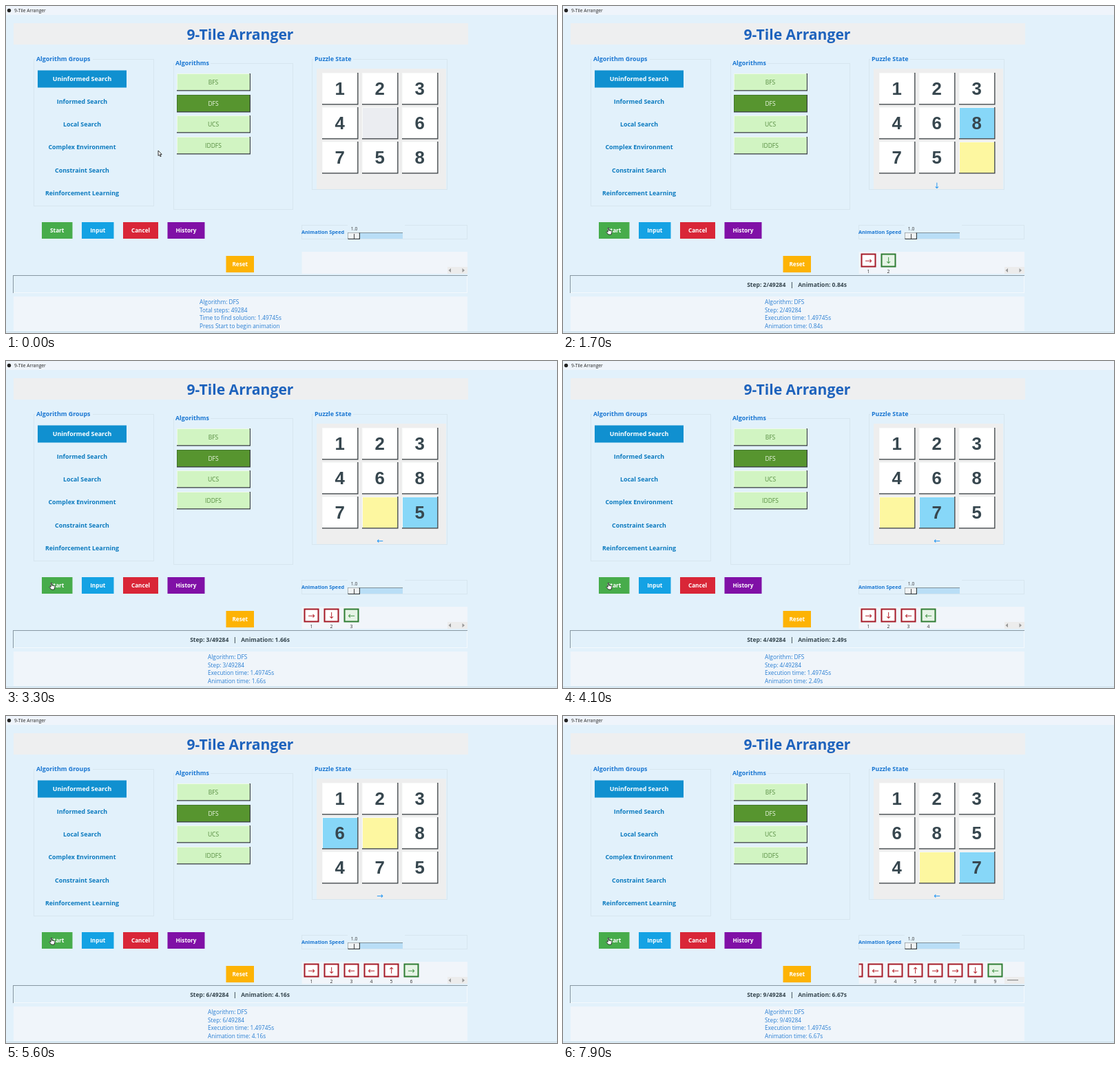
Recreate the animation shown at these times as an HTML page with a canvas. Size 800 by 475 pixels, loop 8000 ms.

```html
<!DOCTYPE html>
<html lang="en">
<head>
<meta charset="utf-8">
<title>9-Tile Arranger</title>
<style>
html, body { margin: 0; overflow: hidden; background: #e2f1fb; }
canvas { display: block; }
</style>
</head>
<body>
<canvas id="stage" width="800" height="475"></canvas>
<script>
const ctx = document.getElementById('stage').getContext('2d');
const LOOP = 8000, TICK = 100;
const FIRST_STEP = 845, STEP_TIME = 830, TOTAL = 49284;
const MOVES = '→↓←←↑→→↓←';
const OFFSET = { '→': 1, '←': -1, '↓': 3, '↑': -3 };
const UI = '"Open Sans", sans-serif';
const TITLE = '9-Tile Arranger';
const BLUE = '#1976d2', INK = '#37474f';

function rect(x, y, w, h, color) {
  ctx.fillStyle = color;
  ctx.fillRect(x, y, w, h);
}

function text(str, x, y, size, color, { bold = true, align = 'center', family = UI, rise = 0.355 } = {}) {
  ctx.font = `${bold ? 700 : 400} ${size}px ${family}`;
  ctx.textAlign = align;
  ctx.fillStyle = color;
  ctx.fillText(str, x, y + size * rise);
}

function arrow(dir, x, y, size, color) {
  text(dir, x, y, size, color, { bold: false, family: '"DejaVu Sans", sans-serif', rise: 0.31 });
}

function bevel(x, y, w, h, fill, light = '#f8faf9') {
  rect(x, y, w, h, '#3a4144');
  rect(x, y, w - 1.4, h - 1.4, light);
  rect(x + 1, y + 1, w - 2.4, h - 2.4, fill);
}

function flatButton(label, x, y, w, h, fill) {
  rect(x, y, w, h, fill);
  text(label, x + w / 2, y + h / 2, 8.2, '#fff');
}

function outline(x, y, w, h) {
  ctx.strokeStyle = '#d7e6ef';
  ctx.lineWidth = 1;
  ctx.strokeRect(x + 0.5, y + 0.5, w, h);
}

function group(label, x, y, w, h, labelX, labelW) {
  outline(x, y, w, h);
  rect(labelX - 2, y - 6, labelW + 4, 12, '#e2f1fb');
  text(label, labelX, y, 8.9, BLUE, { align: 'left' });
}

function drawWindow() {
  rect(0, 0, 800, 475, '#e2f1fb');
  rect(0, 0, 800, 13, '#eff4fb');
  ctx.fillStyle = '#222';
  ctx.beginPath();
  ctx.arc(4.5, 6.5, 2.7, 0, 7);
  ctx.fill();
  text(TITLE, 12, 6.5, 6.7, '#222', { bold: false, align: 'left' });
  rect(11, 25, 660, 31, '#eeeff0');
  text(TITLE, 340, 41.5, 21.1, '#1e63bd');
  rect(0, 473, 800, 1, '#c9dae5');
}

function drawMenus() {
  group('Algorithm Groups', 40, 77, 174, 213, 44, 80);
  rect(46, 93.5, 129, 25, '#1090d0');
  ['Uninformed Search', 'Informed Search', 'Local Search', 'Complex Environment',
    'Constraint Search', 'Reinforcement Learning'].forEach((label, i) =>
    text(label, 110.5, 106 + 33.1 * i, 8.9, i ? '#0b7abf' : '#fff'));

  group('Algorithms', 243, 83, 173, 212, 246, 49);
  ['BFS', 'DFS', 'UCS', 'IDDFS'].forEach((label, i) => {
    const y = 98 + 30.7 * i, active = i === 1;
    bevel(248, Math.round(y), 107, 25.5, active ? '#57952f' : '#d1f4c2', active ? '#44772a' : '#eefae8');
    text(label, 301, y + 12.8, 8.5, active ? '#eef8e8' : '#558b3f', { bold: false });
  });

  flatButton('Start', 52, 314, 44.5, 24, '#47ac4b');
  flatButton('Input', 110, 314, 46.5, 24, '#14a2e4');
  flatButton('Cancel', 170, 314, 51, 24, '#d92637');
  flatButton('History', 234.5, 314, 54, 24, '#8010a6');
  flatButton('Reset', 319.5, 363, 40.5, 24, '#fdb305');
}

function drawSlider() {
  outline(429, 318, 240, 20);
  rect(496, 316, 83, 22, '#e2f1fb');
  text('Animation Speed', 429, 328, 7.3, BLUE, { align: 'left' });
  text('1.0', 505.5, 324, 6.7, '#333', { bold: false });
  rect(496, 329, 80, 9, '#7f9098');
  rect(497, 330, 79, 8, '#b9def6');
  bevel(496.5, 329.5, 17.5, 9.5, '#eff3f5');
  rect(505, 331, 1, 7, '#444');
}

function drawPuzzle(step) {
  group('Puzzle State', 444, 77, 196, 189, 448, 54);
  rect(451, 91, 188, 175, '#eeeeee');
  const tiles = [1, 2, 3, 4, 0, 6, 7, 5, 8];
  let empty = 4, moved = -1;
  for (const dir of MOVES.slice(0, step)) {
    moved = empty;
    empty += OFFSET[dir];
    tiles[moved] = tiles[empty];
    tiles[empty] = 0;
  }
  tiles.forEach((value, i) => {
    const x = 459 + 58 * (i % 3), y = 97 + 50 * Math.floor(i / 3);
    const fill = i === moved ? '#87d7f8' : value ? '#fff' : step ? '#fdf7a0' : '#ebedf1';
    bevel(x, y, 52.5, 46.5, fill);
    if (value) text(value, x + 25.7, y + 23, 25.8, INK, { family: '"Liberation Sans", sans-serif' });
  });
  if (step) arrow(MOVES[step - 1], 543, 261, 11.5, '#2196f3');
}

function drawHistory(step) {
  const scroll = Math.max(0, (step + 1) * 29 - 242);
  ctx.save();
  ctx.beginPath();
  ctx.rect(429.5, 357, 241, 33);
  ctx.clip();
  rect(429, 357, 241, 32, '#f1f5fa');
  for (let i = 0; i < step; i++) {
    const x = 432.5 + 29 * i - scroll, current = i === step - 1;
    rect(x, 359.5, 22, 20, current ? '#2f7d33' : '#a51a27');
    rect(x + 2, 361.5, 18, 16, current ? '#e6f4e6' : '#fff');
    arrow(MOVES[i], x + 11, 370, 12.5, current ? '#4b9a4e' : '#b92c35');
    text(i + 1, x + 11, 386, 6.8, '#333', { bold: false });
  }
  ctx.restore();
  rect(641, 379, 29, 10, '#ececec');
  if (scroll) {
    rect(645, 383, 16, 1.2, '#8c8c8c');
  } else {
    ctx.fillStyle = '#999';
    for (const [x, d] of [[646, -3.5], [662.5, 3.5]]) {
      ctx.beginPath();
      ctx.moveTo(x, 381);
      ctx.lineTo(x + d, 384);
      ctx.lineTo(x, 387);
      ctx.fill();
    }
  }
}

// Steps slow down very slightly as the run goes on.
function elapsed(step) {
  const n = step - 1;
  return (0.01 + 0.8255 * n + 0.0008 * n * n).toFixed(2);
}

function drawStatus(step) {
  rect(10, 391, 660, 26, '#8797a2');
  rect(11, 392, 659, 25, '#f4f9fc');
  rect(11, 392, 658, 24, '#e2f1fb');
  rect(11, 422, 659, 50, '#f0f5fa');
  const seconds = elapsed(step);
  if (step) text(`Step: ${step}/${TOTAL}   |   Animation: ${seconds}s`, 339.5, 404.5, 8.53, INK);
  const lines = step
    ? [`Step: ${step}/${TOTAL}`, 'Execution time: 1.49745s', `Animation time: ${seconds}s`]
    : [`Total steps: ${TOTAL}`, 'Time to find solution: 1.49745s', 'Press Start to begin animation'];
  ['Algorithm: DFS', ...lines].forEach((line, i) =>
    text(line, step ? 293 : 281, 430 + 11.6 * i, 8.3, '#2a7fd3', { bold: false, align: 'left' }));
}

const ARROW_CURSOR = new Path2D('M0 0V7.5L1.7 6L3 8.8L4.2 8.2L3 5.5H5.2Z');
const HAND_CURSOR = new Path2D('M1.2 .6Q2 -.4 2.7 .6V4L6.2 4.6Q7 5 6.8 6.5L6 10H2L-1 6.5Q-1 5 1.2 6.2Z');

function drawCursor(t) {
  const p = Math.min(1, Math.max(0, (t - 100) / 600));
  const ease = p * p * (3 - 2 * p);
  const x = 221 - 157 * ease, y = 210 + 112 * ease;
  const overStart = x < 96.5 && y > 314;
  const shape = overStart ? HAND_CURSOR : ARROW_CURSOR;
  ctx.save();
  ctx.translate(x, y);
  ctx.lineWidth = 0.9;
  ctx.strokeStyle = '#222';
  ctx.fillStyle = '#fff';
  ctx.fill(shape);
  ctx.stroke(shape);
  ctx.restore();
}

function frame(now) {
  const t = Math.floor((now % LOOP) / TICK) * TICK;
  const step = t < FIRST_STEP ? 0 : Math.floor((t - FIRST_STEP) / STEP_TIME) + 1;
  drawWindow();
  drawMenus();
  drawSlider();
  drawPuzzle(step);
  drawHistory(step);
  drawStatus(step);
  drawCursor(t);
  requestAnimationFrame(() => frame(performance.now() - start));
}

const start = performance.now();
frame(0);
</script>
</body>
</html>
```
